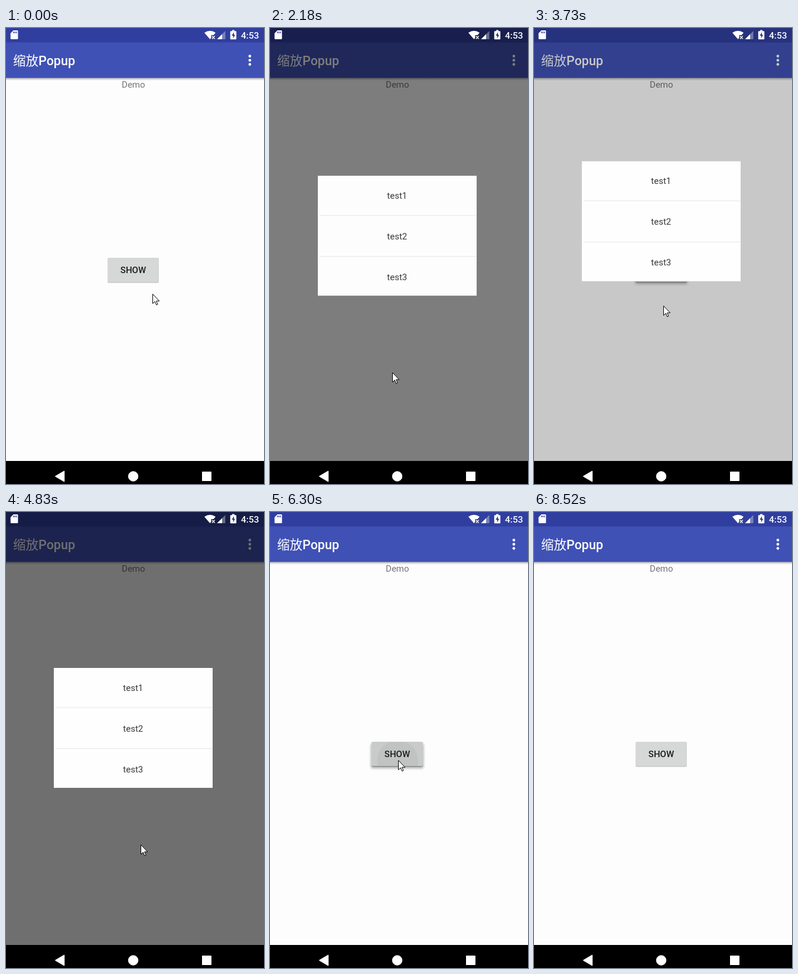
Animation, 437 px wide and 772 px high, one loop 9400 ms. Source, as an HTML page:

```html
<!DOCTYPE html>
<html lang="zh">
<head>
<meta charset="utf-8">
<style>
  html, body { margin: 0; width: 100%; height: 100%; overflow: hidden; background: #000; }
  svg { display: block; width: 437px; height: 772px; font: 15px Roboto, "Noto Sans CJK SC", "Noto Sans CJK", sans-serif; }
  .medium { font-weight: 500; }
  .mid { text-anchor: middle; }
</style>
</head>
<body>
<svg viewBox="0 0 437 772">
  <defs>
    <linearGradient id="fall" x2="0" y2="1">
      <stop stop-color="#000" stop-opacity=".32"/>
      <stop offset="1" stop-color="#000" stop-opacity="0"/>
    </linearGradient>
    <filter id="soft" x="-20%" y="-40%" width="140%" height="180%"><feGaussianBlur stdDeviation="2.2"/></filter>
    <clipPath id="buttonClip"><rect x="172" y="389" width="87" height="41" rx="2"/></clipPath>
  </defs>

  <!-- activity -->
  <rect width="437" height="733" fill="#fdfdfd"/>
  <rect y="84" width="437" height="5" fill="url(#fall)"/>
  <rect width="437" height="84.5" fill="#3f51b5"/>
  <rect width="437" height="24.5" fill="#303f9f"/>
  <text x="12" y="63" font-size="21.5" fill="#fff">缩放<tspan class="medium">Popup</tspan></text>
  <g fill="#fff">
    <circle cx="413" cy="47.6" r="2.3"/><circle cx="413" cy="54.6" r="2.3"/><circle cx="413" cy="61.6" r="2.3"/>
  </g>
  <text class="mid" x="215.8" y="101" fill="#757575">Demo</text>
  <rect x="172" y="390" width="87" height="41.5" rx="2.5" fill="#000" opacity=".22"/>
  <rect id="lift" x="171" y="392" width="89" height="42" rx="3" filter="url(#soft)" opacity="0"/>
  <rect x="172" y="389" width="87" height="41" rx="2" fill="#d6d7d7"/>
  <g id="press" clip-path="url(#buttonClip)" opacity="0">
    <rect x="172" y="389" width="87" height="41" opacity=".06"/>
    <circle id="ripple" cx="216" cy="421" opacity=".04"/>
  </g>
  <text class="medium mid" x="215.5" y="414.5" fill="#1c1c1c">SHOW</text>

  <rect id="dim" width="437" height="733" opacity="0"/>

  <g id="popup">
    <rect x="81" width="269" height="203" fill="#fefefe"/>
    <path d="M84 67h265M84 136.5h265" stroke="#e6e6e6"/>
    <g class="mid" fill="#3a3a3a">
      <text x="215.3" y="38.5">test1</text><text x="215.3" y="107.5">test2</text><text x="215.3" y="176.5">test3</text>
    </g>
  </g>

  <!-- status icons -->
  <g fill="#fff">
    <path d="M12.5 4H19q1.3 0 1.3 1.3v12.4Q20.300 19 19 19H9q-1.300 0-1.300-1.300V9Z"/>
    <path d="M12.700 6v3M15.200 6v3M17.700 6v3" stroke="#303f9f" stroke-width="1.300"/>
    <path d="M336 8Q345.500 1.500 355 8L351.500 12H347.500V16.800L345.500 19Z"/>
    <path d="M349 13.500l4.600 5M353.600 13.500l-4.600 5" stroke="#fff" stroke-width="1.400"/>
    <path d="M371.500 5V19H357.500Z" opacity=".35"/>
    <path d="M366 10.500V19H357.500Z"/>
    <path d="M383 3.500h4v1.800h2.200q1 0 1 1v12q0 1-1 1h-8.400q-1 0-1-1v-12q0-1 1-1H383Z"/>
    <path d="M386 7l-3.600 6h2.300v4.500l3.500-6h-2.200Z" fill="#283587"/>
    <text class="medium" x="398" y="17.800" font-size="15.500">4:53</text>
  </g>

  <!-- navigation bar -->
  <rect y="733" width="437" height="39"/>
  <g fill="#fff" stroke="#fff" stroke-linejoin="round">
    <path d="M84 759l14.500-8.500v17Z" stroke-width="1.500"/>
    <circle cx="215.500" cy="759" r="8.200"/>
    <rect x="332.500" y="751.500" width="15" height="15"/>
  </g>

  <path id="cursor" d="M.5.5V16.500L4.200 13 6.700 18.800 9 17.800 6.600 12.200H11.700Z" fill="#fff" stroke="#000"/>
</svg>
<script>
const $ = id => document.getElementById(id);
const set = (id, attrs) => { for (const k in attrs) $(id).setAttribute(k, attrs[k]); };
const clamp = v => Math.min(1, Math.max(0, v));

const LOOP = 9400, REST_Y = 264, TRAVEL = 126, DIM = 0.56;
const rounds = [
  { press: 720, show: 1180, hide: 2180 },
  { press: 3510, show: 3640, hide: 4950 },
  { press: 6180, show: 6640, hide: 7620 },
];

// Cursor stops: time, x, y
const stops = [
  [30, 248, 450], [470, 225, 420], [1180, 225, 420], [1600, 207, 583],
  [2230, 207, 583], [3000, 214, 396], [3220, 214, 396], [3300, 218, 415],
  [3600, 218, 415], [3730, 219, 470], [3760, 219, 470], [4060, 228, 563],
  [5100, 228, 563], [5780, 217, 410], [5930, 217, 420], [6640, 217, 420],
  [7100, 211, 586], [7900, 211, 586], [8400, 445, 560],
];

const decelerate = x => 1 - (1 - x) ** 2;
const overshoot = (x, tension) => {
  const u = x - 1;
  return u * u * ((tension + 1) * u + tension) + 1;
};
const elapsed = (t, start) => Math.floor((t - start) / 30) * 30 + 25;

function cursorAt(t) {
  const i = stops.findIndex(s => s[0] > t);
  if (i === 0) return stops[0].slice(1);
  if (i < 0) return stops[stops.length - 1].slice(1);
  const [t0, x0, y0] = stops[i - 1], [t1, x1, y1] = stops[i];
  const p = (t - t0) / (t1 - t0), e = p * p * (3 - 2 * p);
  return [x0 + (x1 - x0) * e, y0 + (y1 - y0) * e];
}

function draw(t) {
  let offset = 0, alpha = 0, dim = 0, pressed = 0, radius = 0;
  for (const { press, show, hide } of rounds) {
    if (t >= press && t < show + 300) {
      radius = 90 * decelerate(clamp((t - press) / 560));
      pressed = clamp((t - press) / 60) * (1 - clamp((t - show) / 300));
    }
    if (t >= show && t < hide) {
      const x = clamp(elapsed(t, show) / 540);
      offset = TRAVEL * (1 - overshoot(x, 6));
      alpha = 1;
      dim = decelerate(x);
    } else if (t >= hide && t < hide + 800) {
      const age = elapsed(t, hide);
      offset = TRAVEL * overshoot(clamp(age / 600), -6);
      alpha = (1 + Math.cos(Math.PI * clamp(age / 800))) / 2;
      dim = 1 - decelerate(clamp(age / 500));
    }
  }
  set('popup', { transform: `translate(0 ${REST_Y + offset})`, opacity: alpha });
  set('dim', { opacity: DIM * dim });
  set('press', { opacity: pressed });
  set('lift', { opacity: 0.3 * pressed });
  set('ripple', { r: radius });
  set('cursor', { transform: `translate(${cursorAt(t).map(Math.round)})` });
}

const begin = performance.now();
function tick() {
  draw((performance.now() - begin) % LOOP);
  requestAnimationFrame(tick);
}
tick();
</script>
</body>
</html>
```
